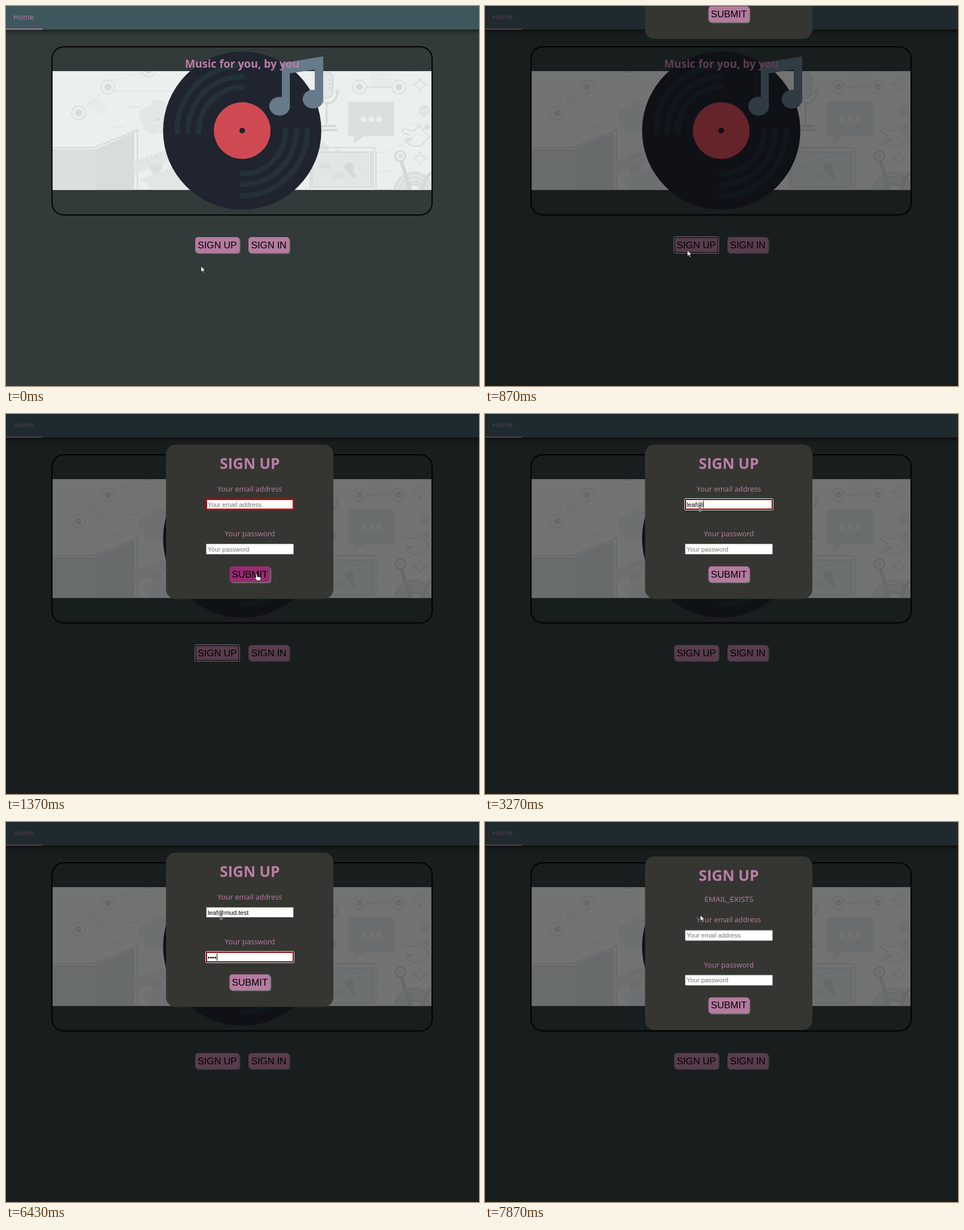
These frames come from a looping animation (835x671 px, 8 s). An HTML page:

```html
<!DOCTYPE html>
<html lang="en">
<head>
<meta charset="utf-8">
<title>Sign up</title>
<style>
html, body { margin: 0; width: 100%; height: 100%; overflow: hidden; background: #323b39; }
svg { display: block; width: 835px; height: 671px; }
text { white-space: pre; }
.ui { font: 12.8px "Open Sans", "Noto Sans", sans-serif; fill: #bb7fa7; }
.bold { font-weight: 700; }
.mid { text-anchor: middle; }
.btn { font: 16.8px "Liberation Sans", Arial, sans-serif; fill: #000; text-anchor: middle; }
.input { font: 11.2px "Liberation Sans", Arial, sans-serif; }
</style>
</head>
<body>
<svg id="stage" viewBox="0 0 835 671" xmlns="http://www.w3.org/2000/svg"></svg>
<script>
const LOOP = 8000;
const PINK = "#b57b9f", HOVER = "#962c70";
const EMAIL = "leaf@mud.test";
const emailKeys = [2500, 2630, 2770, 2870, 3270, 3630, 3800, 3870, 3930, 4230, 4400, 4570, 4670];
const passKeys = [6070, 6200, 6200, 6430, 6700, 6800, 6900, 7100];
const T = { press: 770, open: 837, clickEmail: 2270, tab: 5170, emailOk: 4570, passOk: 6800, send: 7330, reply: 7870 };
const SLIDE = 300;
const HEIGHT = { form: 272.5, loading: 160, error: 306.5 };
// time, x, y of the pointer
const pointerPath = [
  [0, 344, 459], [40, 344, 459], [600, 357, 431], [900, 357, 431], [1370, 441, 283],
  [1470, 441, 283], [1540, 388, 276], [1580, 388, 276], [1930, 383, 178], [2040, 383, 178],
  [2200, 380, 166], [T.send - 1, 380, 166], [T.send, 380, 164], [LOOP, 380, 164]
];

const path = (d, attrs = "") => `<path d="${d}" ${attrs}/>`;
const disc = (x, y, r, attrs = "") => `<circle cx="${x}" cy="${y}" r="${r}" ${attrs}/>`;
const box = (x, y, w, h, r, attrs = "") =>
  `<rect x="${x}" y="${y}" width="${w}" height="${h}" rx="${r}" ${attrs}/>`;
const label = (x, y, str, cls, attrs = "") => `<text x="${x}" y="${y}" class="${cls}" ${attrs}>${str}</text>`;

// CSS-like cubic-bezier(x1, 0, x2, 1)
function ease(x1, x2, x) {
  let lo = 0, hi = 1;
  for (let i = 0; i < 24; i++) {
    const s = (lo + hi) / 2, u = 1 - s;
    if (3 * u * u * s * x1 + 3 * u * s * s * x2 + s ** 3 < x) lo = s; else hi = s;
  }
  return lo * lo * (3 - 2 * lo);
}

function button(id, x, y, w, str) {
  return `<g id="${id}">
    ${box(x + 1.6, y + 1.6, w, 28, 5, 'fill="#777b79" filter="url(#soft)" class="shade"')}
    ${box(x, y, w, 28, 5, `fill="${PINK}" class="face"`)}
    <g class="ring" visibility="hidden">
      ${box(x - .5, y - .5, w + 1, 29, 2, 'fill="none" stroke="#fff"')}
      ${box(x + .7, y + .7, w - 1.4, 26.6, 3, 'fill="none" stroke="#000" stroke-width="1.2"')}
    </g>
    ${label(x + w / 2, y + 19.6, str, "btn")}
  </g>`;
}

function field(id, y) {
  return `<g id="${id}">
    ${box(352.5, y - 1.5, 156, 20, 2, 'fill="none" class="halo"')}
    ${box(353.5, y - .5, 154, 18, 1, 'fill="#fffffb" class="edge"')}
    ${box(354.5, y + .5, 152, 16, 0, 'fill="none" stroke="#c4000c" class="red"')}
    ${label(356, y + 12.6, "", "input")}
    ${path(`M0 ${y + 2}v13`, 'stroke="#000" class="caret"')}
  </g>`;
}

function spinner(x, y) {
  const arc = path("M-16.6-16.6A23.5 23.5 0 0 1 16.6-16.6", 'class="arc"');
  return `<g id="spinner" transform="translate(${x} ${y})" fill="none" stroke="${PINK}"
    stroke-width="6.7">${arc.repeat(4)}</g>`;
}

function node(x, y) {
  return disc(x, y, 12, 'fill="#ebefee"') + disc(x, y, 6, 'fill="#d5dbd9" stroke="none"');
}

function dots(x, y, cols, rows, slant) {
  let out = "";
  for (let r = 0; r < rows; r++)
    for (let c = 0; c < cols; c++)
      out += disc(x + c * 4 + (r % 2) * 2, y + r * 4 + c * slant, .9);
  return `<g fill="#d5dbd9" stroke="none">${out}</g>`;
}

function star(x, y) {
  return path(`M${x} ${y - 12}q2 9 12 12q-10 3-12 12q-2-9-12-12q10-3 12-12z`);
}

function backdropArt() {
  const solid = 'fill="#dbe0df" stroke="none"', pale = 'fill="#e2e7e6" stroke="none"';
  const line = "#d3d9d7";
  return `<g clip-path="url(#panel)">
    ${box(82, 115, 670, 210, 0, 'fill="#ebefee"')}
    <g fill="none" stroke="${line}" stroke-width="1.3">
      ${path("M191 150H300M137 181L171 151M188 134L242 116M655 259C685 259 694 242 716 240M712 210C738 206 744 216 752 211", 'stroke-dasharray="1.5 2"')}
      ${path("M187 213h22M215 178h22M661 292h22M700 115h22", 'stroke-dasharray="3 2"')}
      ${path("M636 143H682")}
      ${node(180, 143)}${node(128, 189)}${node(252, 113)}${node(624, 143)}${node(693.5, 143)}
      ${dots(145, 160, 8, 6, 1.8)}${dots(645, 117, 9, 7, 0)}
      ${disc(268, 180, 15, pale)}${disc(250, 193, 15, pale)}${disc(284, 193, 15, pale)}
      ${disc(258, 212, 15, pale)}${disc(280, 212, 14, pale)}
      ${disc(267, 200, 6, 'fill="#dbe0df" stroke="#ebefee"')}
      ${path("M82 253H158V325H82z", solid)}
      ${path("M158 253L225 224V325H158z", 'fill="#d7dddb" stroke="none"')}
      ${path("M82 250H155L232 219V325M225 224V325", 'stroke-width="2"')}
      ${path("M225 275L290 252V275L225 297z", pale)}
      ${path("M232 274l2 7m6-10l2 7m6-10l2 7m6-10l2 7m6-10l2 7m6-10l2 7")}
      ${path("M238 306l22 19h60l-28-40z", pale)}
      ${path("M264 298C250 290 251 277 258 277Q263 277 265 282Q269 275 274 278C280 285 271 294 264 298z", solid)}
      ${box(555, 117, 22, 45, 10, 'stroke-width="2" fill="#e2e7e6"')}
      ${path("M555 131h8m-8 7h8m-8 7h8m6-14h8m-8 7h8m-8 7h8")}
      ${path("M547 143C547 180 585 180 585 151M566 173V208", 'stroke-width="3"')}
      ${disc(585, 151, 3)}
      ${path("M554 212H582M558 219H585", 'stroke-width="4"')}
      ${box(604, 169, 81, 61, 4, solid)}${path("M614 228V243L633 229z", solid)}
      <g fill="#ebefee" stroke="none">${disc(631, 200, 5)}${disc(645, 200, 5)}${disc(658.5, 200, 5)}</g>
      ${star(731, 139)}${star(731, 269)}
      ${disc(738, 185, 9)}${disc(738, 185, 6.5)}
      ${label(738, 189, "$", "input mid", 'fill="#cdd4d2" stroke="none"')}
      ${disc(743, 214, 5, solid)}
      ${path("M698 219C706 214 713 221 721 220L729 211L747 231L733 246Q720 250 711 244L706 239L717 233L704 235M706 239L715 236M698 219Q699 224 713 228", 'stroke-width="1.6"')}
      ${path("M562 274Q542 252 558 237Q575 249 570 273Q576 250 592 253Q592 271 571 278z", pale)}
      ${box(537, 250, 116, 90, 5, 'stroke-width="2"')}
      ${box(540, 258, 105, 62, 2, 'stroke-width="2" fill="#e2e7e6"')}
      ${path("M648 255v68M528 325h130", 'stroke-width="2"')}
      ${path("M549 287q0-6 6-6q4-8 10-2q7-2 8 8zM575 304q0-6 6-6q4-8 10-2q7-2 8 8z", solid)}
      ${path("M600 291Q594 281 602 277Q612 274 614 284L613 293L619 301L613 305L607 297z", 'fill="#d3d9d7" stroke="none"')}
      ${path("M592 275l-6-4m15-3l-2-7m13 7l4-6m4 15l7-3m-5 12l7 2m-33 5l-6 4")}
      ${disc(720, 328, 36, solid)}${disc(720, 328, 29, 'stroke="#ebefee"')}
      ${disc(720, 328, 22, 'stroke="#ebefee"')}${disc(720, 328, 12, 'fill="#ebefee"')}
      ${path("M698 274L714 325", 'stroke-width="6"')}
      ${disc(696, 265, 9, 'stroke-width="3" fill="#ebefee"')}${disc(696, 265, 4, solid)}
      ${path("M737 325Q738 302 752 294", 'stroke-width="5"')}
    </g>
  </g>`;
}

function record() {
  const grooves = [76.5, 95.5, 115].map(r =>
    path(`M${417 - r} 222V220A${r} ${r} 0 0 1 417 ${220 - r}M${417 + r} 219V220A${r} ${r} 0 0 1 417 ${220 + r}`)).join("");
  return disc(417, 220, 139.7, 'fill="#1f242e"') +
    `<g fill="none" stroke="#24313a" stroke-width="9.6" stroke-linecap="round">${grooves}</g>` +
    disc(417, 220, 50, 'fill="#d04a53"') + disc(417, 220, 5, 'fill="#1f242e"') +
    `<g fill="#667a89">
      ${path("M487 101L560 89V165H545V112L501 119V178H487z")}
      <ellipse cx="483" cy="177" rx="18.3" ry="16.5"/><ellipse cx="542" cy="164.5" rx="18.3" ry="16.5"/>
    </g>`;
}

const stage = document.getElementById("stage");
stage.innerHTML = `
  <defs>
    <clipPath id="panel">${box(82, 115, 669.5, 209.7, 0)}</clipPath>
    <filter id="soft"><feGaussianBlur stdDeviation=".6"/></filter>
    <filter id="navBlur" x="-5%" width="110%" y="-50%" height="220%"><feGaussianBlur stdDeviation="4"/></filter>
  </defs>
  ${box(0, 0, 835, 671, 0, 'fill="#323b39"')}
  ${box(-10, 2, 855, 42, 0, 'fill="#000" fill-opacity=".6" filter="url(#navBlur)"')}
  ${box(0, 0, 835, 41.5, 0, 'fill="#3e575d"')}
  ${box(0, 39.8, 65, 2, 0, `fill="${PINK}"`)}
  ${label(13, 24.3, "Home", "ui")}
  ${backdropArt()}
  ${record()}
  ${box(81.2, 72, 671, 297, 21, 'fill="none" stroke="#000" stroke-width="2"')}
  ${label(417, 108.5, "Music for you, by you", "ui bold mid", 'style="font-size:19.1px"')}
  ${button("signUp", 334, 408, 78, "SIGN UP")}
  ${button("signIn", 428, 408, 72, "SIGN IN")}
  ${box(0, 0, 835, 671, 0, 'id="shade" fill="#000003" fill-opacity=".515"')}
  <g id="modal">
    ${box(282.5, 54, 295.5, HEIGHT.form, 17, 'id="sheet" fill="#353631"')}
    ${label(430.3, 97.3, "SIGN UP", "ui bold mid", 'style="font-size:26.1px"')}
    ${label(430.5, 134, "EMAIL_EXISTS", "ui mid", 'id="error" style="font-size:13.5px"')}
    ${spinner(430.3, 156)}
    <g id="form">
      ${label(430.5, 136.6, "Your email address", "ui mid")}
      ${field("email", 151)}
      ${label(430.5, 215.8, "Your password", "ui mid")}
      ${field("pass", 230)}
      ${button("submit", 394.5, 269, 72, "SUBMIT")}
    </g>
  </g>
  <g id="pointer">
    ${path("M0 0V11L2.6 8.8L4.4 12.8L6.3 11.9L4.5 8.1H8z", 'id="arrow" fill="#fff" stroke="#000" stroke-width=".9"')}
    ${path("M0 0Q1.5-1.5 2.5 0V4L9 5V9L7 11.5H2.5L-2 6.5Q-1.5 5 0 6z", 'id="hand" fill="#fff" stroke="#000" stroke-width=".8"')}
    <g id="beam" fill="none">
      ${path("M-2.5-5H2.5M0-5V5M-2.5 5H2.5", 'stroke="#fff" stroke-width="2.4"')}
      ${path("M-2.5-5H2.5M0-5V5M-2.5 5H2.5", 'stroke="#000"')}
    </g>
  </g>`;

const $ = id => document.getElementById(id);
const show = (el, on) => el.setAttribute("visibility", on ? "visible" : "hidden");
const mount = (el, on) => el.setAttribute("display", on ? "inline" : "none");
const move = (el, x, y) => el.setAttribute("transform", `translate(${x} ${y})`);
const typed = (keys, t) => keys.filter(k => k <= t).length;

function pointerAt(t) {
  const i = Math.max(1, pointerPath.findIndex(p => p[0] > t));
  const [t0, x0, y0] = pointerPath[i - 1], [t1, x1, y1] = pointerPath[i];
  const p = (t - t0) / (t1 - t0), e = p * p * (3 - 2 * p);
  return [x0 + (x1 - x0) * e, y0 + (y1 - y0) * e];
}

function drawField(id, s) {
  const part = name => $(id).querySelector(name);
  const text = part("text"), edge = part(".edge"), halo = part(".halo");
  text.textContent = s.value || s.hint;
  text.setAttribute("fill", s.value ? "#000" : "#757575");
  edge.setAttribute("stroke", s.focus ? "#000" : s.bad ? "#c4000c" : s.hover ? "#5c5c60" : "#a3a3a4");
  halo.setAttribute("stroke", s.focus ? "#fff" : "#c4000c");
  halo.setAttribute("stroke-opacity", s.focus ? 1 : .7);
  show(halo, s.focus || s.bad);
  show(part(".red"), s.bad);
  show(part(".caret"), s.caret);
  const x = 356.5 + (s.value ? text.getComputedTextLength() : 0);
  part(".caret").setAttribute("transform", `translate(${Math.floor(x) + .5} 0)`);
}

function drawButton(id, hover, focus) {
  const b = $(id);
  b.querySelector(".face").setAttribute("fill", hover ? HOVER : PINK);
  show(b.querySelector(".ring"), focus);
  show(b.querySelector(".shade"), !focus);
}

function drawSpinner(t) {
  $("spinner").querySelectorAll(".arc").forEach((arc, i) => {
    const turn = ((t - T.send + (3 - i) * 150) / 1200) % 1;
    arc.setAttribute("transform", `rotate(${360 * ease(.5, .5, turn)})`);
  });
}

// slides from -100% to 20% of its own height, so the rest position follows the height
function drawModal(t, state) {
  const h = HEIGHT[state];
  const p = ease(0, .58, Math.min(1, Math.max(0, (t - T.open) / SLIDE)));
  mount($("modal"), t >= T.open);
  move($("modal"), 0, (1.2 * p - 1) * h - .2 * HEIGHT.form);
  $("sheet").setAttribute("height", h);
  mount($("error"), state === "error");
  mount($("spinner"), state === "loading");
  mount($("form"), state !== "loading");
  move($("form"), 0, state === "error" ? HEIGHT.error - HEIGHT.form : 0);
  if (state === "loading") drawSpinner(t);
}

function render(ms) {
  const t = Math.floor(ms * .03 + .15) / .03 + 4;
  const sent = t >= T.send;
  const state = !sent ? "form" : t < T.reply ? "loading" : "error";
  const [x, y] = pointerAt(Math.min(t, LOOP - 1));
  const ready = t >= T.open + SLIDE && !sent;
  const over = (x0, y0, x1, y1) => x >= x0 && x <= x1 && y >= y0 && y <= y1;
  const overSignUp = t < T.open && over(334, 408, 412, 436);
  const overSubmit = ready && over(394, 269, 467, 298);
  const overPass = ready && over(353, 229, 508, 248);
  const overEmail = ready && over(353, 150, 508, 169);

  show($("shade"), t >= T.open);
  drawModal(t, state);
  drawButton("signUp", overSignUp, t >= T.press && t < T.clickEmail);
  drawButton("submit", overSubmit, false);

  const emailFocus = t >= T.clickEmail && t < T.tab;
  const passFocus = t >= T.tab && !sent;
  const lastKey = Math.max(...[T.clickEmail, T.tab, ...emailKeys, ...passKeys].filter(k => k <= t), 0);
  const lit = t - lastKey < 598;
  drawField("email", {
    value: sent ? "" : EMAIL.slice(0, typed(emailKeys, t)), hint: "Your email address",
    focus: emailFocus, bad: t < T.emailOk, hover: overEmail, caret: emailFocus && lit
  });
  drawField("pass", {
    value: sent ? "" : "•".repeat(typed(passKeys, t)), hint: "Your password",
    focus: passFocus, bad: t >= passKeys[0] && t < T.passOk, hover: overPass, caret: passFocus && lit
  });

  const hand = overSignUp || overSubmit, beam = overPass || overEmail;
  move($("pointer"), x, y);
  show($("hand"), hand);
  show($("beam"), beam);
  show($("arrow"), !hand && !beam);
}

const start = performance.now();
function tick() {
  render((performance.now() - start) % LOOP);
  requestAnimationFrame(tick);
}
tick();
</script>
</body>
</html>
```
